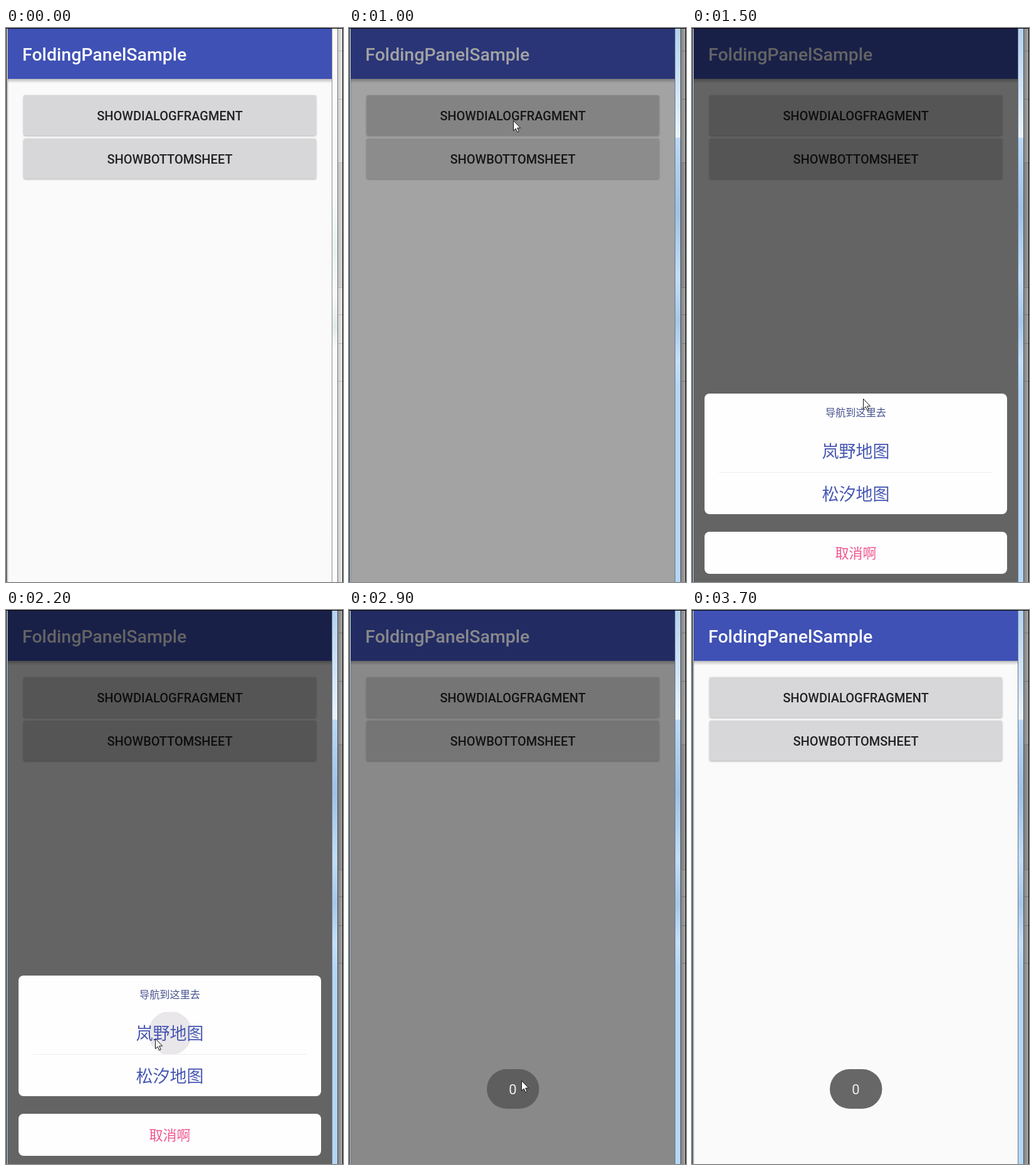
An HTML page with a canvas for the animation above (4200 ms loop, 538x882 px).

```html
<!DOCTYPE html>
<html lang="zh-CN">
<head>
<meta charset="utf-8">
<title>Bottom sheet demo</title>
<style>
html, body { margin: 0; width: 100%; height: 100%; overflow: hidden; background: #000; }
canvas { display: block; }
</style>
</head>
<body>
<canvas id="stage" width="538" height="882"></canvas>
<script>
const ctx = document.getElementById('stage').getContext('2d');
const LOOP = 4200, STEP = 100;
const ROBOTO = 'Roboto, sans-serif';
const HAN = '"Noto Sans CJK SC", "Noto Sans CJK", sans-serif';

// Each key is [time, value, ...]; values between keys are linear.
const DIM = [[900, 0], [1000, .35], [1100, .6], [2700, .6], [2800, .56], [2900, .456], [3000, .25], [3100, .08], [3200, 0]];
const SHEET = [[1100, 310], [1200, 95], [1300, 0], [2400, 0], [2500, 30], [2600, 117], [2700, 310]];
const TOAST = [[2500, 0], [2600, .48], [2700, .9], [2800, 1]];
const BUTTON_RIPPLE = [[700, 0], [800, 75], [900, 175], [1000, 235]];
const ROW_RIPPLE = [[2100, 0], [2200, 35], [2600, 183], [2700, 225]];
const FOCUS = [[0, 0], [100, .5], [200, 1]];
const POINTER = [
  [200, 440, 840], [400, 330, 420], [600, 262, 147], [1100, 262, 147], [1200, 265, 155],
  [1300, 275, 192], [1400, 274, 420], [1500, 273, 590], [1700, 271, 610], [1800, 271, 610],
  [1900, 252, 655], [2000, 238, 682], [2300, 238, 682], [2600, 269, 722], [2900, 275, 749],
  [3000, 305, 650], [3300, 424, 268], [3600, 528, 139]
];

function at(keys, t) {
  if (t <= keys[0][0]) return keys[0].slice(1);
  const i = keys.findIndex(k => k[0] >= t);
  if (i < 0) return keys[keys.length - 1].slice(1);
  const a = keys[i - 1], b = keys[i], p = (t - a[0]) / (b[0] - a[0]);
  return a.slice(1).map((v, n) => v + (b[n + 1] - v) * p);
}

function rect(x, y, w, h, color) {
  ctx.fillStyle = color;
  ctx.fillRect(x, y, w, h);
}

function round(x, y, w, h, r, color) {
  ctx.fillStyle = color;
  ctx.beginPath();
  ctx.roundRect(x, y, w, h, r);
  ctx.fill();
}

function text(str, x, y, font, color, align = 'center') {
  ctx.font = font;
  ctx.fillStyle = color;
  ctx.textAlign = align;
  ctx.fillText(str, x, y);
}

function gradient(x0, y0, x1, y1, stops) {
  const g = ctx.createLinearGradient(x0, y0, x1, y1);
  stops.forEach(([p, color]) => g.addColorStop(p, color));
  return g;
}

function ripple(x, y, w, h, r, color) {
  ctx.save();
  ctx.beginPath();
  ctx.roundRect(x, y, w, h, 3);
  ctx.clip();
  ctx.fillStyle = color;
  ctx.beginPath();
  ctx.arc(262, y + h / 2, r, 0, 7);
  ctx.fill();
  ctx.restore();
}

function drawEdges(active) {
  const sides = active
    ? { left: '#dfeaf4', line: '#66788c', glass: [[0, '#b4d2f0'], [.1, '#cfe3f6'], [.197, '#eaf3fb'],
        [.199, '#bcd9f5'], [.33, '#a0c2e6'], [.45, '#c3def6'], [.53, '#a8c8e9'], [.6, '#c6e0f8'], [.65, '#b5d6f6'], [1, '#b5d6f6']],
        seam: '#4c5258', panel: ['#858585', '#a6a6a6'], rule: '#777' }
    : { left: '#fff', line: '#8c8c8c', glass: [[0, '#fdfdfd'], [.3, '#f8fafa'], [.4, '#e9f2f1'], [.48, '#f8fafa'],
        [.54, '#e4eaea'], [.58, '#fafbfb'], [1, '#fdfdfd']],
        seam: '#777', panel: ['#cfcfcf', '#eaeaea'], rule: '#b9b9b9' };
  rect(1, 1, 2, 881, sides.left);
  rect(2, 1, 1, 881, sides.line);
  rect(520, 1, 1, 881, sides.line);
  rect(521, 1, 8, 881, gradient(0, 0, 0, 882, sides.glass));
  rect(529, 1, 1, 881, sides.seam);
  rect(530, 1, 7, 881, gradient(530, 0, 537, 0, sides.panel.map((c, i) => [i, c])));
  rect(530, 214, 7, 199, 'rgba(0,0,0,.07)');
  [36, 113, 214, 413, 456, 502, 562].forEach(y => rect(530, y, 7, 1, sides.rule));
}

function drawButton(y, label, pressed, radius, strength) {
  ctx.save();
  ctx.shadowColor = 'rgba(0,0,0,.3)';
  ctx.shadowBlur = 3;
  ctx.shadowOffsetY = 1;
  round(28, y, 467, 64, 3, '#d7d6d8');
  ctx.restore();
  if (pressed) {
    ctx.globalAlpha = strength;
    round(28, y, 467, 64, 3, '#cbcbcb');
    ripple(28, y, 467, 64, radius, '#c3c3c4');
    ctx.globalAlpha = 1;
  }
  text(label, 261.5, y + 40, '500 20px ' + ROBOTO, '#222224');
}

function drawApp(t) {
  rect(3, 1, 517, 881, '#fafafa');
  rect(3, 81, 517, 7, gradient(0, 81, 0, 88, [[0, 'rgba(0,0,0,.25)'], [1, 'rgba(0,0,0,0)']]));
  rect(3, 1, 517, 80, '#3f51b5');
  text('FoldingPanelSample', 26, 52, '500 28.5px ' + ROBOTO, '#fafafc', 'left');
  drawButton(107, 'SHOWDIALOGFRAGMENT', t >= 800 && t < 1100, at(BUTTON_RIPPLE, t)[0], t < 1000 ? 1 : .5);
  drawButton(176, 'SHOWBOTTOMSHEET');
  rect(3, 1, 517, 881, `rgba(0,0,0,${at(DIM, t)[0]})`);
}

function drawSheet(t) {
  ctx.save();
  ctx.beginPath();
  ctx.rect(3, 1, 517, 881);
  ctx.clip();
  ctx.translate(0, at(SHEET, t)[0]);
  round(20, 582, 483, 192, 8, '#fefefe');
  ripple(20, 640, 483, 67, at(ROW_RIPPLE, t)[0], '#e9e7ea');
  rect(43, 707, 437, 1, '#ececee');
  text('导航到这里去', 261.5, 618, '16.2px ' + HAN, '#45528f');
  text('岚野地图', 261.5, 684, '27px ' + HAN, '#4858b3');
  text('松汐地图', 261.5, 752, '27px ' + HAN, '#4858b3');
  round(20, 802, 483, 67, 8, '#fefefe');
  text('取消啊', 261.5, 844, '22px ' + HAN, '#f0568f');
  ctx.restore();
}

function drawToast(alpha) {
  ctx.globalAlpha = alpha;
  round(220, 731, 83.5, 63, 31.5, 'rgba(91,91,92,.92)');
  text('0', 261.5, 771, '22px ' + ROBOTO, '#eee');
  ctx.globalAlpha = 1;
}

function drawPointer([x, y]) {
  ctx.beginPath();
  [[0, 0], [0, 16], [3.7, 12.6], [6.3, 18.4], [8.7, 17.4], [6.2, 11.6], [11.2, 11.6]]
    .forEach(([dx, dy]) => ctx.lineTo(x + dx + .5, y + dy + .5));
  ctx.closePath();
  ctx.fillStyle = '#fff';
  ctx.fill();
  ctx.strokeStyle = '#111';
  ctx.lineWidth = 1;
  ctx.stroke();
}

function draw(now) {
  const t = Math.floor(now % LOOP / STEP) * STEP;
  const focus = at(FOCUS, t)[0];
  rect(0, 0, 538, 882, '#000');
  drawEdges(false);
  ctx.globalAlpha = focus;
  drawEdges(true);
  ctx.globalAlpha = 1;
  drawApp(t);
  if (t > 1100 && t < 2700) drawSheet(t);
  drawToast(at(TOAST, t)[0]);
  if (t >= 200 && t <= 3600) drawPointer(at(POINTER, t));
  rect(537, 0, 1, 882, '#000');
  requestAnimationFrame(tick);
}

const start = performance.now();
function tick() { draw(performance.now() - start); }
tick();
</script>
</body>
</html>
```
